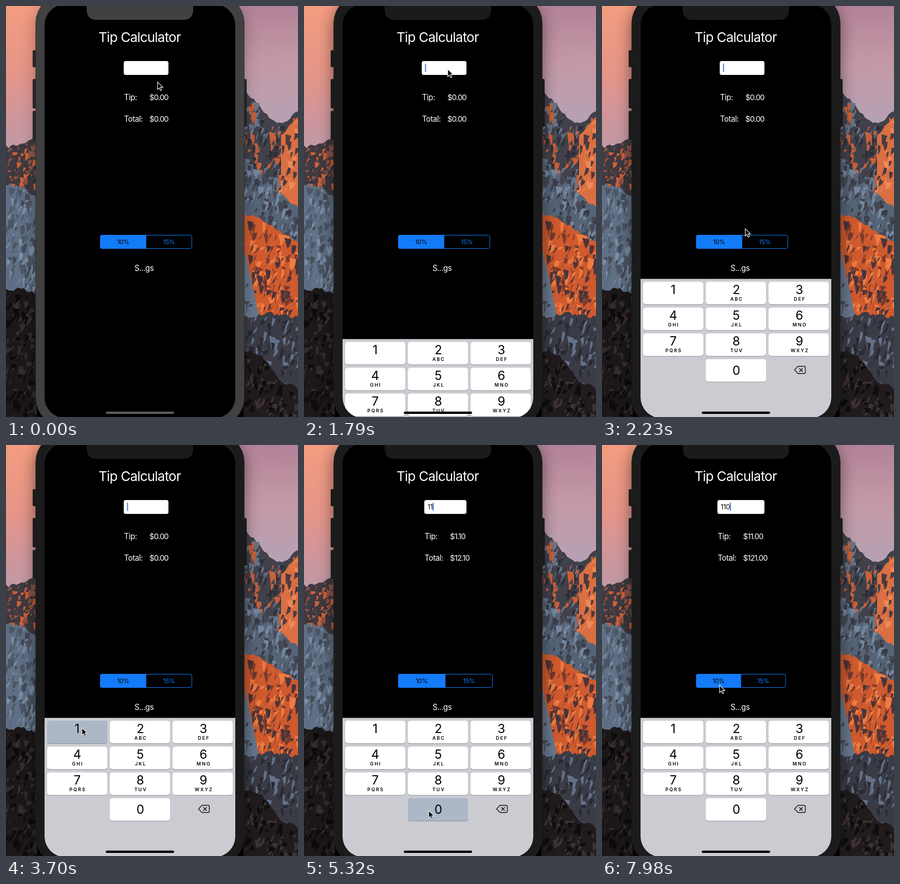
Animation, 568 px wide and 799 px high, one loop 8 s. Source, as an HTML page:

```html
<!DOCTYPE html>
<html lang="en">
<head>
<meta charset="utf-8">
<title>Tip Calculator</title>
<style>
html, body { margin: 0; width: 100%; height: 100%; overflow: hidden; background: #000; }
svg { display: block; width: 100%; height: 100%; }
text { font-family: Inter, Roboto, sans-serif; }
.label { font-size: 15.2px; letter-spacing: -.5px; fill: #fff; }
.money { font-size: 14.8px; letter-spacing: -.85px; fill: #fff; }
.seg { font-size: 12px; letter-spacing: -.25px; text-anchor: middle; }
.digit { font-size: 24px; text-anchor: middle; }
.letters { font-size: 9px; font-weight: 600; letter-spacing: 2px; text-anchor: middle; }
</style>
</head>
<body>
<svg viewBox="0 0 568 799">
  <defs>
    <linearGradient id="skyL" x2="0" y2="1">
      <stop offset="0" stop-color="#f39c80"/><stop offset=".45" stop-color="#e59587"/>
      <stop offset=".75" stop-color="#cf969b"/><stop offset="1" stop-color="#bd9aa8"/>
    </linearGradient>
    <linearGradient id="skyR" x2="0" y2="1">
      <stop offset="0" stop-color="#b28298"/><stop offset=".45" stop-color="#c499a6"/>
      <stop offset="1" stop-color="#b3a3b5"/>
    </linearGradient>
    <clipPath id="screen"><rect x="75" y="-3" width="371" height="804" rx="40"/></clipPath>
    <filter id="blur" x="-30%" y="-20%" width="160%" height="140%"><feGaussianBlur stdDeviation="15"/></filter>
    <filter id="soft" x="-50%" y="-50%" width="200%" height="200%"><feGaussianBlur stdDeviation="1"/></filter>
  </defs>

  <rect width="90" height="290" fill="url(#skyL)"/>
  <rect x="430" width="138" height="250" fill="url(#skyR)"/>
  <g id="scene"></g>
  <rect id="shadow" x="57" y="-14" width="407" height="840" rx="58" filter="url(#blur)"/>

  <g id="buttons" stroke="#0b0b0d" stroke-width=".8">
    <rect x="52.4" y="86.4" width="8" height="32" rx="1.5"/>
    <rect x="52.4" y="142.4" width="8" height="56" rx="1.5"/>
    <rect x="52.4" y="204.4" width="8" height="54" rx="1.5"/>
    <rect x="460" y="142.4" width="7.6" height="91" rx="1.5"/>
  </g>
  <rect id="body" x="57.7" y="-24" width="405.8" height="843" rx="58" stroke="#222224" stroke-width=".6"/>
  <rect x="75" y="-3" width="371" height="804" rx="40"/>

  <g clip-path="url(#screen)">
    <text x="260" y="70" font-size="26" letter-spacing="-.8" fill="#fff" text-anchor="middle">Tip Calculator</text>
    <rect id="field" y="107" height="27" rx="4" fill="#fff"/>
    <text id="amount" y="125" font-size="13" letter-spacing="-.3"></text>
    <rect id="caret" y="112" width="1.8" height="16" fill="#4169dc"/>
    <text class="label" id="tipLabel" y="183">Tip:</text>
    <text class="money" id="tip" y="183"></text>
    <text class="label" id="totalLabel" y="224.5">Total:</text>
    <text class="money" id="total" y="224.5"></text>
    <path id="segOn" fill="#137bf8"/>
    <rect id="segBox" x="183.5" y="445.5" height="26" rx="3.5" fill="none" stroke="#137bf8"/>
    <text class="seg" id="low" y="462.7">10%</text>
    <text class="seg" id="high" y="462.7" fill="#137bf8">15%</text>
    <text class="label" x="250" y="515">S...gs</text>
    <g id="keyboard">
      <rect x="75" y="530.5" width="371" height="270" fill="#cbccd2"/>
      <g id="keys"></g>
      <path d="M374.5 707.5L381.2 700.5H393Q395.5 700.5 395.5 703V712Q395.5 714.5 393 714.5H381.2ZM383.7 704.2l6.8 6.8M390.5 704.2l-6.8 6.8" fill="none" stroke="#111" stroke-width="1.4" stroke-linejoin="round"/>
    </g>
    <rect id="home" x="194" y="788.5" width="133" height="4.6" rx="2.3"/>
  </g>
  <path id="notch" d="M151 -4Q157 -3 157 4V7Q157 27 177 27H344Q364 27 364 7V4Q364 -3 370 -4Z"/>

  <g id="cursor">
    <path d="M1 2V16.5L4.4 13.2L6.6 18.4L9.2 17.3L7 12.2H11.6Z" opacity=".4" filter="url(#soft)"/>
    <path d="M.7 .9V15.2L4 12.1L6.2 17.3L8.7 16.2L6.5 11.1H11Z" stroke="#fff" stroke-width="1.1"/>
  </g>
</svg>
<script>
const LOOP = 8000, STEP = 147.8;
const NS = 'http://www.w3.org/2000/svg';
const $ = id => document.getElementById(id);
const clamp = v => Math.min(1, Math.max(0, v));
const smooth = v => v * v * (3 - 2 * v);

function set(el, attrs) {
  for (const k in attrs) el.setAttribute(k, attrs[k]);
  return el;
}
function add(parent, tag, attrs, label) {
  const el = set(document.createElementNS(NS, tag), attrs);
  if (label) el.textContent = label;
  return parent.appendChild(el);
}

// Mountain backdrop
let seed = 7;
const rnd = () => (seed = seed * 16807 % 2147483647) / 2147483647;
const left = [0, 60], right = [462, 106];

// A jagged ridge through evenly spaced heights, covered with rock facets
function range([x, w], heights, depth, size, base, ...tones) {
  const ridge = px => {
    const u = (px - x) / w * (heights.length - 1);
    const i = Math.min(Math.floor(u), heights.length - 2);
    return heights[i] + (heights[i + 1] - heights[i]) * (u - i);
  };
  let d = `M${x} 799`;
  for (let px = x; px <= x + w; px += 5) d += `L${px} ${ridge(px) + rnd() * 7 - 3}`;
  add($('scene'), 'path', { d: d + `L${x + w} ${ridge(x + w)}V799Z`, fill: base });

  const count = w * depth / (size * 14);
  for (const fill of tones) {
    let d = '';
    for (let i = 0; i < count; i++) {
      const px = x + rnd() * w, s = size * (.3 + rnd()), b = 2 + rnd() * 6;
      const py = ridge(px) + 3 + rnd() * depth;
      d += `M${px} ${py}l${(rnd() - .7) * s} ${s}l${b} ${-s * .35}l${b * .4} ${-s * .5}z`;
    }
    add($('scene'), 'path', { d, fill });
  }
}

range(left, [274, 268, 252], 90, 14, '#3f3a41', '#35323b', '#cf6038', '#8d5346');
range(left, [345, 352, 372], 180, 18, '#5f6f85', '#454a55', '#7b8fa8', '#4d5664');
range(left, [552, 550, 556], 240, 16, '#1c1718', '#352c2e', '#0c0a0b');
range(right, [165, 188, 222, 226, 202], 150, 20, '#41414b', '#65758b', '#c96039', '#2e2e37');
range([535, 33], [250, 215], 110, 18, '#d96f42', '#ee8856', '#4c3a40');
range(right, [300, 325, 365, 392], 100, 18, '#566477', '#3a3b46', '#7587a0', '#444955');
range(right, [405, 412, 438, 458], 180, 22, '#cf5a2e', '#7a3a2a', '#ee7c43', '#4a343a');
range([462, 30], [465, 600], 120, 18, '#67778d', '#454a55');
range(right, [604, 597, 606], 130, 20, '#3a3b45', '#62728a', '#2a2a32');
range(right, [668, 678, 728, 742], 110, 15, '#211b1d', '#3d3335', '#0f0c0e');

// Keypad
const keys = {};
function addKey(digit, col, row, small) {
  const x = 80 + col * 122, y = 536 + row * 50.2, mid = x + 58.5 + col * .7;
  const g = $('keys');
  add(g, 'rect', { x, y: y + 1, width: 117, height: 44, rx: 5, fill: '#8b8d92' });
  keys[digit] = add(g, 'rect', { x, y, width: 117, height: 44, rx: 5 });
  add(g, 'text', { x: mid, y: y + (digit ? 24 : 30), class: 'digit' }, String(digit));
  if (small) add(g, 'text', { x: mid + 1, y: y + 36.6, class: 'letters' }, small);
}
' ABC DEF GHI JKL MNO PQRS TUV WXYZ'.split(' ')
  .forEach((s, i) => addKey(i + 1, i % 3, Math.floor(i / 3), s));
addKey(0, 1, 3);

// All moments below are counted in screen steps
const KEYBOARD = 12;
const taps = [
  { key: 1, down: 23, up: 27 },
  { key: 1, down: 30, up: 32 },
  { key: 0, down: 36, up: 38 }
];
const moves = [
  { from: 0, to: 1, x: 279, y: 122 },
  { from: 12, to: 15, x: 278, y: 432 },
  { from: 16, to: 20, x: 166, y: 547 },
  { from: 21, to: 23, x: 147, y: 549 },
  { from: 26, to: 28, x: 184, y: 665 },
  { from: 28, to: 31, x: 163, y: 572 },
  { from: 32, to: 36, x: 242, y: 710 },
  { from: 40, to: 42, x: 321, y: 488 },
  { from: 43, to: 51, x: 228, y: 466 }
];

function pointer(n) {
  let x = 294, y = 147;
  for (const m of moves) {
    const k = smooth(clamp((n - m.from) / (m.to - m.from)));
    x += (m.x - x) * k;
    y += (m.y - y) * k;
  }
  return [x, y];
}

function drawFrame(n) {
  const focus = 1 - (1 - clamp((n - 2) / 4)) ** 2;
  const shade = (off, on) => {
    const v = Math.round(off + (on - off) * focus);
    return `rgb(${v},${v},${v})`;
  };
  set($('body'), { fill: shade(65, 27) });
  set($('notch'), { fill: shade(65, 27) });
  set($('buttons'), { fill: shade(38, 26) });
  set($('shadow'), { opacity: .28 + .2 * focus });
}

function drawForm(n) {
  const typed = taps.filter(t => t.up <= n);
  const amount = typed.map(t => t.key).join('');
  const tip = '$' + (amount * .1).toFixed(2);
  $('amount').textContent = amount;
  $('tip').textContent = tip;
  $('total').textContent = '$' + (amount * 1.1).toFixed(2);

  // The layout follows the width of the tip: ones are narrow
  const ones = tip.split('1').length - 1;
  const x = 229.5 + 2.5 * ones - 9.5 * (tip.length - 5);
  set($('field'), { x: x - .5, width: 316.5 - x });
  set($('amount'), { x: x + 6 });
  for (const id of ['tipLabel', 'totalLabel']) set($(id), { x });
  for (const id of ['tip', 'total']) set($(id), { x: x + 49.6 });

  const end = x + 132, mid = (184 + end) / 2;
  set($('segBox'), { width: end - 183.5 });
  set($('segOn'), { d: `M${mid} 445H187Q183 445 183 449V468Q183 472 187 472H${mid}Z` });
  set($('low'), { x: (183 + mid) / 2 });
  set($('high'), { x: (mid + end) / 2 });

  // The caret blinks anew after each digit
  const since = typed.length ? typed[typed.length - 1].up : KEYBOARD;
  const phase = (n - since) * STEP % 1000;
  const lit = n >= KEYBOARD && (phase < 600 || phase > 850);
  const width = amount ? $('amount').getComputedTextLength() : 0;
  set($('caret'), { x: x + 6 + width, opacity: lit ? 1 : 0 });
}

function drawKeyboard(n) {
  const drop = n < KEYBOARD ? 280 : 117 * .08 ** (n - KEYBOARD);
  set($('keyboard'), { transform: `translate(0 ${Math.round(drop)})` });
  set($('home'), { fill: n < KEYBOARD ? '#5b5b5b' : '#000' });
  for (const d in keys) {
    const down = taps.some(t => t.key == d && n >= t.down && n < t.up);
    set(keys[d], { fill: down ? '#acb8c8' : '#fff' });
  }
}

function draw(t) {
  const n = Math.floor((t + 6) / STEP);
  drawFrame(n);
  drawForm(n);
  drawKeyboard(n);
  set($('cursor'), { transform: `translate(${pointer(n)})` });
}

function tick() {
  draw(performance.now() % LOOP);
  requestAnimationFrame(tick);
}
tick();
</script>
</body>
</html>
```
